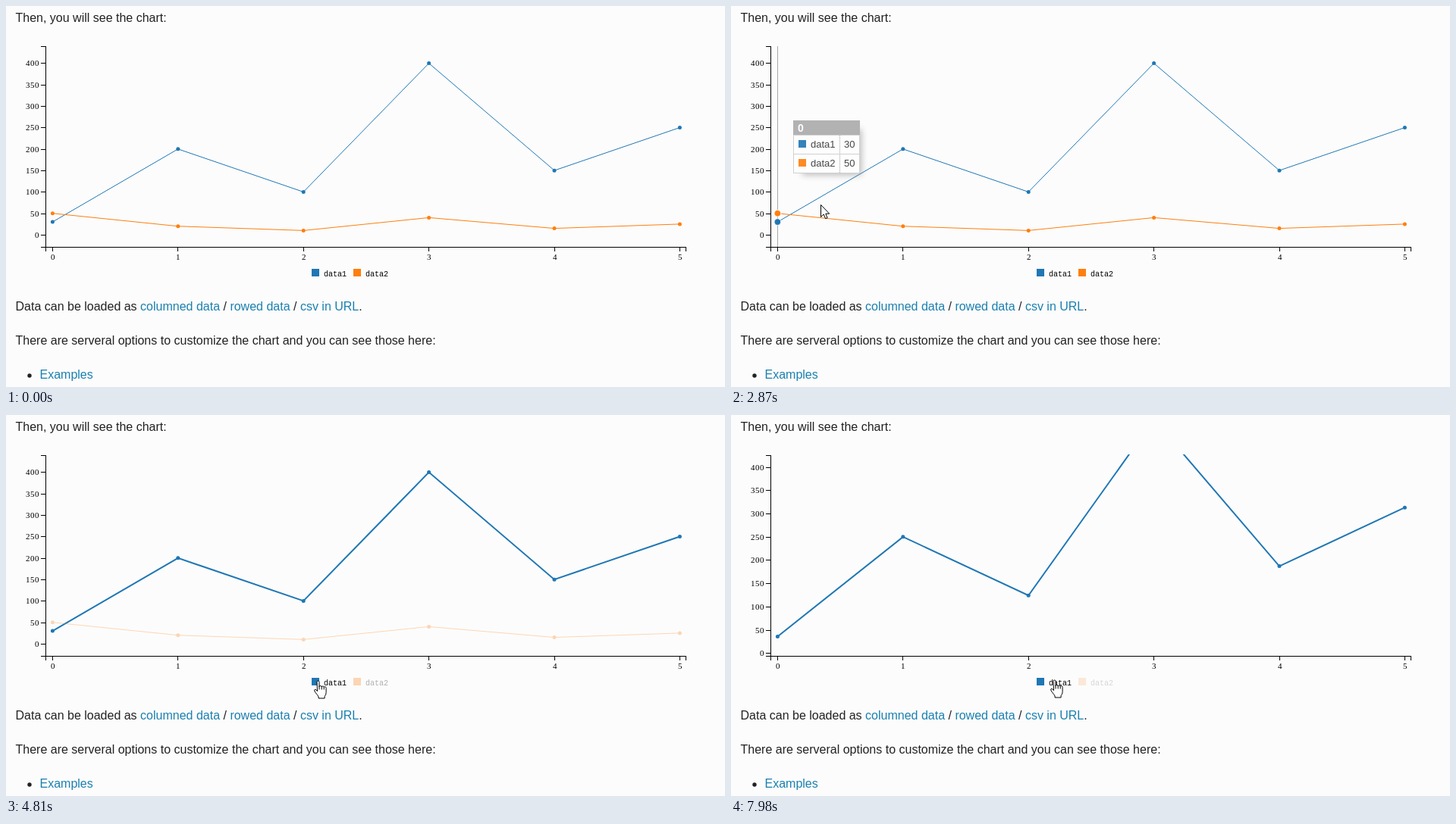
An HTML page that plays this animation: 948 px wide and 503 px high, repeating every 8 s.

```html
<!DOCTYPE html>
<html lang="en">
<head>
<meta charset="utf-8">
<title>Line chart</title>
<style>
html, body { margin: 0; width: 100%; height: 100%; overflow: hidden; background: #fcfcfc; }
svg { display: block; }
.body { font: 16px "Liberation Sans", Arial, sans-serif; fill: #222; }
.body .link { fill: #1a80b0; }
.ticks { font: 11px "Liberation Serif", serif; letter-spacing: .5px; }
.legend { font: 10px "Liberation Mono", monospace; }
.tip { font: 13px "Liberation Sans", Arial, sans-serif; fill: #333; }
.axis { stroke: #000; fill: none; shape-rendering: crispEdges; }
</style>
</head>
<body>
<svg id="stage" width="948" height="503" viewBox="0 0 948 503">
  <defs>
    <clipPath id="plot"><rect x="20" y="52" width="900" height="267"/></clipPath>
    <clipPath id="chart"><rect x="0" y="48" width="948" height="320"/></clipPath>
    <filter id="blur" x="-50%" y="-50%" width="200%" height="200%"><feGaussianBlur stdDeviation="4"/></filter>
  </defs>
  <g class="body">
    <text x="12.5" y="21">Then, you will see the chart:</text>
    <text x="12.5" y="402">Data can be loaded as <tspan class="link">columned data</tspan> / <tspan class="link">rowed data</tspan> / <tspan class="link">csv in URL</tspan>.</text>
    <text x="12.5" y="447">There are serveral options to customize the chart and you can see those here:</text>
    <circle cx="31" cy="488" r="2.7"/>
    <text x="44.5" y="492" class="link">Examples</text>
  </g>
  <path class="axis" d="M46 53.5H52.5V318.5H46M52.5 324V318.5H896.5V324"/>
  <g id="xTicks" class="ticks" text-anchor="middle"></g>
  <g id="yTicks" class="ticks" text-anchor="end" clip-path="url(#chart)"></g>
  <path id="guide" stroke="#aaa" shape-rendering="crispEdges"/>
  <g id="lines" clip-path="url(#plot)"></g>
  <g id="legend" class="legend"></g>
  <g id="tip" class="tip" opacity=".9"></g>
  <g id="cursor" fill="#fff" stroke="#000" stroke-linejoin="round">
    <path id="arrow" d="M.5.5V16.5l3.7-3.5 2.4 5.7 2.5-1.1-2.3-5.4h4.9z"/>
    <path id="hand" d="M-2 1.5q0-1.5 1.5-1.5t1.5 1.5v6q0-1 1.5-1t1.7 1.5q0-1 1.5-1t1.5 1.5q0-.8 1.4-.8t1.5 1.8v6q0 3-2 5v2.5h-8v-2q-1-2-4-5.5-2.5-3.2-1-4t3.4 2.2zM1 7v4.5M4.2 8v3.5M7.2 8.5v3"/>
  </g>
</svg>
<script>
const LOOP = 8000, FADE = 200, MOVE = 250, LINE_LAG = 28;
const series = [
  { name: 'data1', color: '#1f77b4', values: [30, 200, 100, 400, 150, 250], keyX: 403 },
  { name: 'data2', color: '#ff7f0e', values: [50, 20, 10, 40, 15, 25], keyX: 458 }
];
const HIDE_1 = 5200, HIDE_2 = 6520, SHOW_1 = 7755;

// Pointer tip: time, x, y
const path = [
  [970, 537, 492], [1080, 410, 462], [1250, 240, 352], [1460, 206, 188],
  [1760, 112, 150], [2040, 112, 150], [2270, 215, 278], [2480, 250, 240],
  [2650, 190, 225], [2830, 118, 262], [2870, 118, 262], [3200, 190, 290],
  [3580, 306, 289], [3690, 342, 282], [3950, 420, 215], [4150, 520, 120],
  [4340, 499, 131], [4490, 482, 250], [4520, 482, 255], [4640, 440, 335],
  [4700, 418, 363], [4810, 412, 351], [5200, 412, 351], [5300, 410, 350],
  [5600, 410, 350], [5810, 476, 350], [6160, 476, 350], [6330, 469, 350],
  [7180, 469, 350], [7370, 412, 350], [7460, 427, 350], [8000, 427, 350]
];

const $ = id => document.getElementById(id);
const clamp = v => Math.max(0, Math.min(1, v));
const mix = (a, b, p) => a + (b - a) * p;
const ease = t => t < .5 ? 4 * t ** 3 : 1 - 4 * (1 - t) ** 3;
const progress = (t, start, length) => ease(clamp((t - start) / length));
const px = i => 61.4 + 165.4 * i;
const scale = (min, max) => v => 296.4 - (v - min) * 220.8 / (max - min);
const range = (from, to, step) =>
  Array.from({ length: (to - from) / step + 1 }, (_, i) => from + i * step);

function add(parent, tag, attrs, text) {
  const el = document.createElementNS('http://www.w3.org/2000/svg', tag);
  set(el, attrs);
  if (text !== undefined) el.textContent = text;
  return parent.appendChild(el);
}
function set(el, attrs) {
  for (const key in attrs) el.setAttribute(key, attrs[key]);
}
const show = (el, on) => el.setAttribute('visibility', on ? 'visible' : 'hidden');

const wide = range(0, 400, 50), narrow = range(10, 50, 5);
const both = scale(10, 400), second = scale(10, 50), first = scale(30, 400);
const stages = [
  { start: -LOOP, from: both, to: both, ticks: wide },
  { start: HIDE_1, from: both, to: second, ticks: narrow },
  { start: SHOW_1, from: second, to: first, ticks: wide }
];

for (let i = 0; i < 6; i++) {
  const x = Math.floor(px(i)) + .5;
  add($('xTicks'), 'path', { class: 'axis', d: `M${x} 318V324` });
  add($('xTicks'), 'text', { x: x + .5, y: 335 }, i);
}
const yTicks = [...new Set([...wide, ...narrow])].map(value => {
  const g = add($('yTicks'), 'g', {});
  add(g, 'path', { class: 'axis', d: 'M46 .5H52' });
  add(g, 'text', { x: 44, y: 4 }, value);
  return { value, g };
});
for (const s of series) {
  s.group = add($('lines'), 'g', {});
  s.line = add(s.group, 'path', { fill: 'none', stroke: s.color });
  s.dots = s.values.map((_, i) => add(s.group, 'circle', { cx: px(i), fill: s.color }));
  s.key = add($('legend'), 'g', {});
  add(s.key, 'rect', { x: s.keyX, y: 347, width: 10, height: 10, fill: s.color });
  add(s.key, 'text', { x: s.keyX + 16, y: 356.5 }, s.name);
}

const tip = $('tip');
const shadow = add(tip, 'rect', { x: 12, y: 12, height: 60, fill: '#777', opacity: .55, filter: 'url(#blur)' });
const panel = add(tip, 'rect', { x: .5, y: .5, height: 69, fill: '#fff', stroke: '#ccc' });
const head = add(tip, 'rect', { height: 19, fill: '#aaa' });
const title = add(tip, 'text', { x: 6, y: 15, fill: '#fff', 'font-size': 14, 'font-weight': 'bold' });
title.style.fontSize = '14px';
const rule = add(tip, 'path', { stroke: '#ccc' });
add(tip, 'path', { d: 'M61.5 20V69', stroke: '#999', 'stroke-dasharray': '1 1' });
const cells = series.map((s, i) => {
  const y = 26 + 25 * i;
  add(tip, 'rect', { x: 7, y, width: 10, height: 10, fill: s.color });
  add(tip, 'text', { x: 23, y: y + 10 }, s.name);
  return add(tip, 'text', { y: y + 10, 'text-anchor': 'end' });
});

function pointer(t) {
  const i = path.findIndex(p => p[0] > t);
  if (i === 0) return null;
  const a = path[i - 1], b = path[i], p = (t - a[0]) / (b[0] - a[0]);
  return { x: mix(a[1], b[1], p), y: mix(a[2], b[2], p) };
}

// Index of the hovered column, or -1 outside the plot and between columns
function column(at) {
  if (!at || at.y < 53 || at.y > 318 || at.x < 53 || at.x > 896) return -1;
  const u = (at.x - px(0)) / 165.4, i = Math.round(u);
  return Math.abs(u - i) > .477 ? -1 : i;
}

function drawTip(i, y) {
  show(tip, i >= 0);
  show($('guide'), i >= 0);
  if (i < 0) return;
  const x = Math.floor(px(i));
  set($('guide'), { d: `M${x + .5} 53V318` });
  const digits = Math.max(...series.map(s => String(s.values[i]).length));
  const w = Math.round(61 + 13 + 7.23 * digits);
  const top = y + 15 + 96 > 368 ? y - 111 : y + 15;
  set(tip, { transform: `translate(${x + 21} ${Math.round(top)})` });
  set(shadow, { width: w - 10 });
  set(panel, { width: w - 1 });
  set(head, { width: w });
  set(rule, { d: `M0 19.5H${w}M0 44.5H${w}` });
  title.textContent = i;
  cells.forEach((cell, k) => {
    set(cell, { x: w - 6.5 });
    cell.textContent = series[k].values[i];
  });
}

function draw(t) {
  const at = pointer(t);
  const over = at && at.y > 345 && at.y < 359
    ? series.findIndex(s => at.x > s.keyX - 1 && at.x < s.keyX + 47) : -1;
  const hidden = [t >= HIDE_1 && t < SHOW_1, t >= HIDE_2];
  const focus = over >= 0 && !hidden[over] ? over : -1;
  const alpha = [
    1 - progress(t, HIDE_1, FADE) + progress(t, SHOW_1, FADE),
    1 - progress(t, HIDE_2, FADE)
  ];
  const n = stages.filter(s => t >= s.start).length - 1, stage = stages[n];
  const axisP = progress(t, stage.start, MOVE);
  const lineP = progress(t, stage.start + LINE_LAG, MOVE);
  const place = (v, p) => mix(stage.from(v), stage.to(v), p);

  for (const { value, g } of yTicks) {
    const on = stage.ticks.includes(value);
    show(g, on);
    if (!on) continue;
    const kept = n > 0 && stages[n - 1].ticks.includes(value);
    set(g, {
      transform: `translate(0 ${Math.floor(place(value, axisP) + .3)})`,
      opacity: kept ? 1 : axisP
    });
  }

  const col = column(at);
  series.forEach((s, k) => {
    const ys = s.values.map(v => place(v, lineP));
    const dim = focus >= 0 && focus !== k ? .3 : 1;
    set(s.group, { opacity: alpha[k] * dim });
    set(s.line, {
      d: 'M' + ys.map((y, i) => `${px(i)} ${y}`).join('L'),
      'stroke-width': focus === k ? 2 : 1
    });
    s.dots.forEach((dot, i) => set(dot, {
      cy: ys[i],
      r: i === col ? 4.4 : 2.5,
      stroke: i === col ? '#fff' : 'none'
    }));
    set(s.key, { opacity: mix(.15, hidden[k] ? 1 : dim, alpha[k]) });
  });

  drawTip(col, at ? at.y : 0);
  show($('arrow'), at && over < 0);
  show($('hand'), at && over >= 0);
  if (at) set($('cursor'), { transform: `translate(${Math.round(at.x)} ${Math.round(at.y)})` });
}

const began = performance.now();
function frame() {
  draw((performance.now() - began) % LOOP);
  requestAnimationFrame(frame);
}
frame();
</script>
</body>
</html>
```
